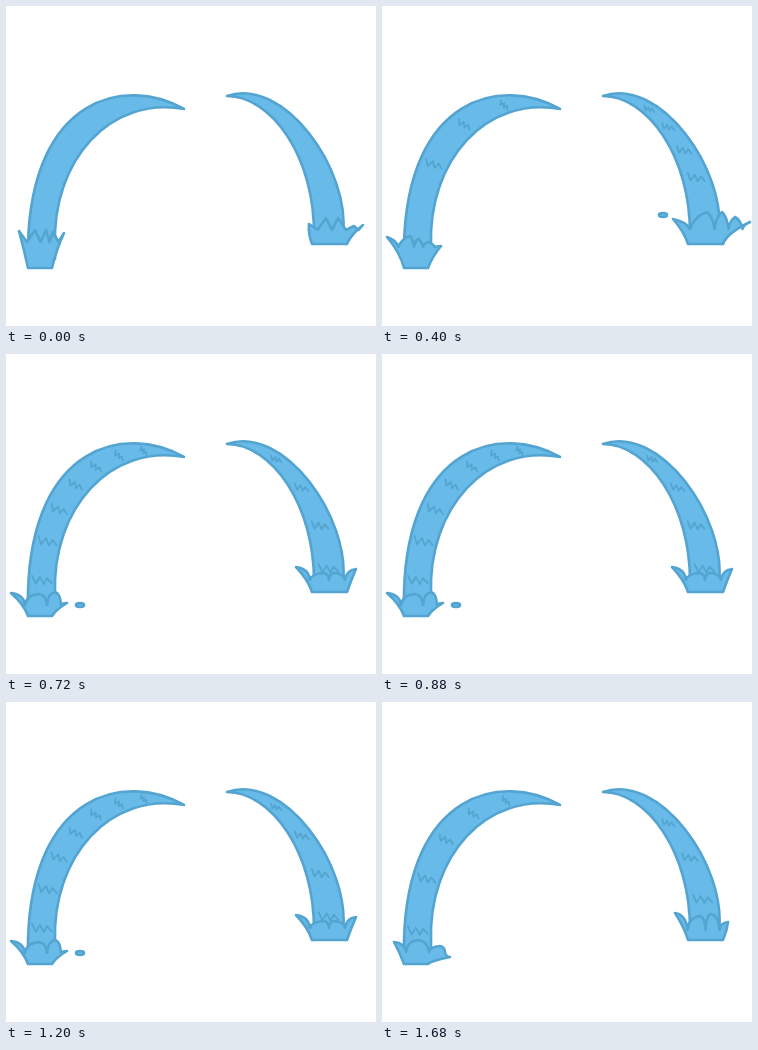
Recreate the animation shown at these times as an HTML page. Size 370 by 320 pixels, loop 1.76 s.

```html
<!DOCTYPE html>
<html lang="en">
<head>
<meta charset="utf-8">
<style>
  html, body { margin: 0; height: 100%; overflow: hidden; background: #fff; }
  svg { display: block; }
  path, ellipse { fill: #68bbe8; stroke: #54a4d1; stroke-width: 2.6; stroke-linejoin: round; stroke-linecap: round; }
  .mark { fill: none; stroke-width: 1.8; vector-effect: non-scaling-stroke; }
</style>
</head>
<body>
<svg id="stage" width="370" height="320" viewBox="0 0 370 320"></svg>
<script>
const STEP = 80;
const SEQUENCE = "abababar" + "rp".repeat(6) + "rr";

// Each stream tapers between two cubic curves that share the tip.
// A pose has its splash tips, the height of the valleys between them,
// and its marks as [first position, gap, count] along the stream.
const left = {
  outer: [[178, 103], [120, 70], [26, 90], [22, 238]],
  inner: [[178, 103], [104, 90], [46, 154], [49, 240]],
  foot: 253, base: [22, 46, 262], twist: 50,
  poses: {
    a: { tips: [[13, 225], [29, 224], [40, 224], [47, 226], [58, 227]], valley: 236, round: 0, marks: [.28, .22, 3] },
    b: { tips: [[5, 231], [28, 230], [36, 233], [46, 236], [59, 240]], valley: 241, round: .5, marks: [.28, .22, 3] },
    p: { tips: [[5, 239], [33, 240], [49, 238], [61, 249]], valley: 251, round: .8, marks: [.2, .127, 7], drop: [74, 251] },
    r: { tips: [[12, 240], [36, 238], [58, 244], [68, 255]], valley: 250, round: .8, marks: [.27, .175, 5] }
  }
};

const right = {
  outer: [[221, 90], [277, 70], [345, 163], [337, 230]],
  inner: [[221, 90], [265, 90], [309, 150], [308, 230]],
  foot: 232, base: [306, 341, 238], twist: 20,
  poses: {
    a: { tips: [[303, 218], [320, 212], [332, 212], [348, 220], [357, 219]], valley: 224, round: 0, marks: [.31, .14, 4] },
    b: { tips: [[291, 213], [325, 206], [340, 206], [353, 211], [368, 216]], valley: 223, round: .5, marks: [.31, .14, 4], drop: [281, 209] },
    p: { tips: [[290, 213], [318, 219], [328, 219], [350, 215]], valley: 226, round: .8, marks: [.33, .2, 4] },
    r: { tips: [[293, 211], [318, 214], [329, 212], [346, 220]], valley: 228, round: .8, marks: [.45, .2, 3] }
  }
};

const lerp = (a, b, t) => a + (b - a) * t;
const path = d => `<path d="${d}"/>`;

function bezier([a, b, c, d], t) {
  const u = 1 - t;
  return [0, 1].map(i => u ** 3 * a[i] + 3 * u * u * t * b[i] + 3 * u * t * t * c[i] + t ** 3 * d[i]);
}

function arc({ outer, inner, foot }) {
  const [tip, ...down] = outer;
  const [, c1, c2, end] = inner;
  return path(`M${tip}C${down}V${foot}H${end[0]}V${end[1]}C${c2} ${c1} ${tip}Z`);
}

function mark(side, t) {
  const [x1, y1] = bezier(side.outer, t), [x2, y2] = bezier(side.inner, t);
  const scale = Math.min(1, .3 + .8 * t);
  return `<path class="mark" d="M-10-4L-6 4-2-3 2 4 5-2 10 3" transform="translate(${(x1 + x2) / 2} ${(y1 + y2) / 2}) rotate(${side.twist * (1 - t)}) scale(${scale})"/>`;
}

function splash([x1, x2, bottom], { tips, valley, round }) {
  const first = tips[0], last = tips[tips.length - 1];
  let d = `M${x1} ${bottom}Q${x1 - 4} ${(first[1] + bottom) / 2} ${first}`;
  for (let i = 1; i < tips.length; i++) {
    const [ax, ay] = tips[i - 1], [bx, by] = tips[i];
    const x = (ax + bx) / 2;
    const bend = (tx, ty) => `${lerp((x + tx) / 2, x, round)} ${lerp((valley + ty) / 2, ty, round)}`;
    d += `Q${bend(ax, ay)} ${x} ${valley}Q${bend(bx, by)} ${bx} ${by}`;
  }
  return path(`${d}Q${x2 + 4} ${(last[1] + bottom) / 2} ${x2} ${bottom}Z`);
}

function stream(side, step) {
  const pose = side.poses[SEQUENCE[step]];
  const [start, gap, count] = pose.marks;
  const visible = Math.min(count, Math.ceil(step * .8));
  let shapes = arc(side);
  for (let i = 0; i < visible; i++) shapes += mark(side, start + gap * i);
  shapes += splash(side.base, pose);
  if (pose.drop) shapes += `<ellipse cx="${pose.drop[0]}" cy="${pose.drop[1]}" rx="4" ry="2"/>`;
  return shapes;
}

const stage = document.getElementById("stage");
let shown = -1;

function draw() {
  const step = Math.floor(performance.now() / STEP) % SEQUENCE.length;
  if (step !== shown) {
    shown = step;
    stage.innerHTML = stream(left, step) + stream(right, step);
  }
  requestAnimationFrame(draw);
}
draw();
</script>
</body>
</html>
```
